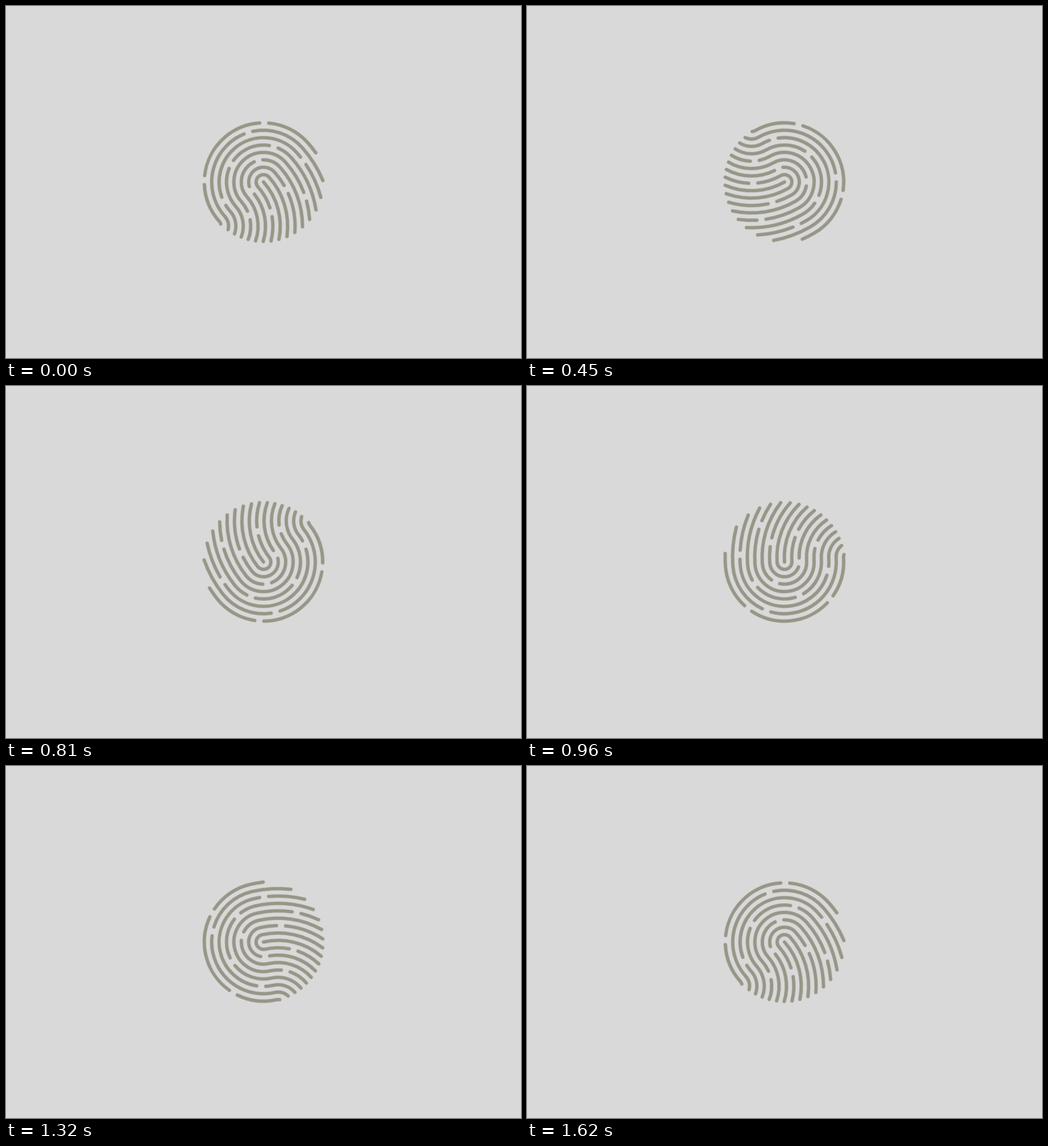
An HTML page that plays this animation: 905x619 px, repeating every 1.65 s.

```html
<!DOCTYPE html>
<html lang="en">
<head>
<meta charset="utf-8">
<title>Turning fingerprint</title>
<style>
  html, body { margin: 0; width: 100%; height: 100%; overflow: hidden; background: #d9d9d9; }
  svg { display: block; width: 905px; height: 619px; }
  #print {
    fill: none;
    stroke: #979687;
    stroke-width: 6;
    stroke-linecap: round;
    transform-origin: 0 0;
    animation: turn 1650ms -1ms infinite;
  }
  /* 53 steps of 30 ms, then a short rest at the full turn */
  @keyframes turn {
    0% { transform: rotate(-41.6deg); animation-timing-function: steps(53, end); }
    96.363636%, 100% { transform: rotate(318.4deg); }
  }
</style>
</head>
<body>
<svg viewBox="0 0 905 619">
  <g transform="translate(452.5 309.5)"><g id="print"></g></g>
</svg>
<script>
  const STEP = 13;   // distance between ridges
  const BEND = 117;  // radius of the middle ridge's tail
  const GAP = 16;

  // Gap centres along each ridge, measured from its apex
  const gaps = [
    [], [-71.2], [-38.2, 77.1], [19.2], [-109.7, 151.4],
    [-22.8, 65.1], [-101.4, 140.5], [38.8], [-84.6, 76.5]
  ];

  // Tail of ridge side j: an arc around (-BEND, 0), cut off at the rim
  function tail(j) {
    const rim = Math.abs(j) === 8 ? 105.3 : 104.4;
    const r = BEND + STEP * j;
    const a = Math.acos((BEND * BEND + r * r - rim * rim) / (2 * BEND * r));
    return { r, length: r * a, end: `${r * Math.cos(a) - BEND} ${r * Math.sin(a)}` };
  }

  const arc = (r, sweep, to) => `A${r} ${r} 0 0 ${sweep} ${to}`;

  function addRidge(k) {
    const left = tail(-k), right = tail(k), r = STEP * k;
    const path = document.createElementNS("http://www.w3.org/2000/svg", "path");
    const head = k
      ? `M${left.end}` + arc(left.r, 0, `${-r} 0`) + arc(r, 1, `${r} 0`)
      : "M0 0";
    path.setAttribute("d", head + arc(right.r, 1, right.end));

    if (gaps[k].length) {
      const apex = left.length + r * Math.PI / 2;
      const dashes = [];
      let from = 0;
      for (const g of gaps[k]) {
        const cut = apex + g - GAP / 2;
        dashes.push(cut - from, GAP);
        from = cut + GAP;
      }
      path.setAttribute("stroke-dasharray", [...dashes, 999, 0].join(" "));
    }
    document.getElementById("print").append(path);
  }

  gaps.forEach((_, k) => addRidge(k));
</script>
</body>
</html>
```
